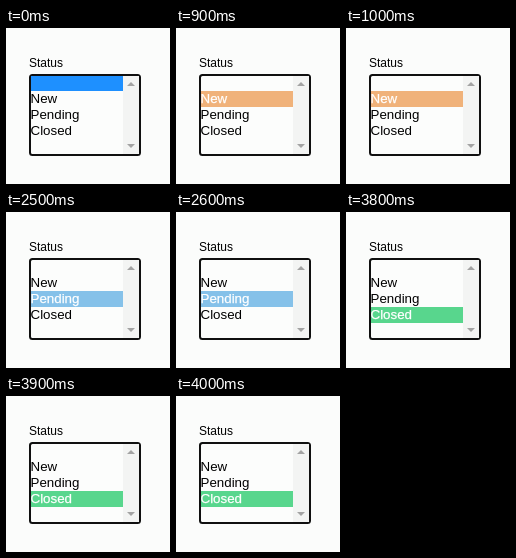
Write an HTML page that moves like this. It is 164 px wide and 156 px high and loops after 5.7 s.

```html
<!DOCTYPE html>
<html lang="en">
<head>
<meta charset="utf-8">
<title>Status list</title>
<style>
  html, body { margin: 0; width: 100%; height: 100%; overflow: hidden; background: #fbfcfb; }
  svg { display: block; width: 100vw; height: 100vh; }
  text { font-family: "Liberation Sans", Arial, sans-serif; fill: #000; }
  .label { font-size: 12px; }
  .item { font-size: 13.333px; }
  .item.on { fill: #fff; stroke: #fff; stroke-width: .25px; }
</style>
</head>
<body>
<svg viewBox="0 0 164 156" xmlns="http://www.w3.org/2000/svg">
  <rect width="164" height="156" fill="#fbfcfb"/>
  <text class="label" x="23" y="39">Status</text>
  <rect x="24" y="47" width="110" height="80" rx="2.5" fill="#fcfdfc" stroke="#101010" stroke-width="2"/>
  <rect x="117" y="48" width="16" height="78" fill="#f3f4f3"/>
  <path d="M121 58h8l-4-4zM121 116h8l-4 4z" fill="#a3a3a3"/>
  <rect id="bar" x="25" width="92" height="16"/>
  <g id="items"></g>
</svg>
<script>
  const LOOP = 5700, TOP = 47, ROW = 16;
  const labels = ["", "New", "Pending", "Closed"];
  const colors = ["#1e90ff", "#f0b27a", "#85c1e9", "#58d68d"];
  const starts = [0, 900, 2500, 3800];
  const bar = document.getElementById("bar");
  const list = document.getElementById("items");

  const items = labels.map((label, i) => {
    const t = document.createElementNS("http://www.w3.org/2000/svg", "text");
    t.setAttribute("x", 24.5);
    t.setAttribute("y", TOP + ROW * i + 12);
    t.textContent = label;
    list.appendChild(t);
    return t;
  });

  function draw(ms) {
    const sel = starts.filter(s => s <= ms).length - 1;
    bar.setAttribute("y", sel ? TOP + ROW * sel : TOP + 1);
    bar.setAttribute("height", sel ? ROW : ROW - 1);
    bar.setAttribute("fill", colors[sel]);
    items.forEach((t, i) => t.setAttribute("class", i === sel ? "item on" : "item"));
  }

  const begin = performance.now();
  function tick() {
    draw((performance.now() - begin) % LOOP);
    requestAnimationFrame(tick);
  }
  tick();
</script>
</body>
</html>
```
